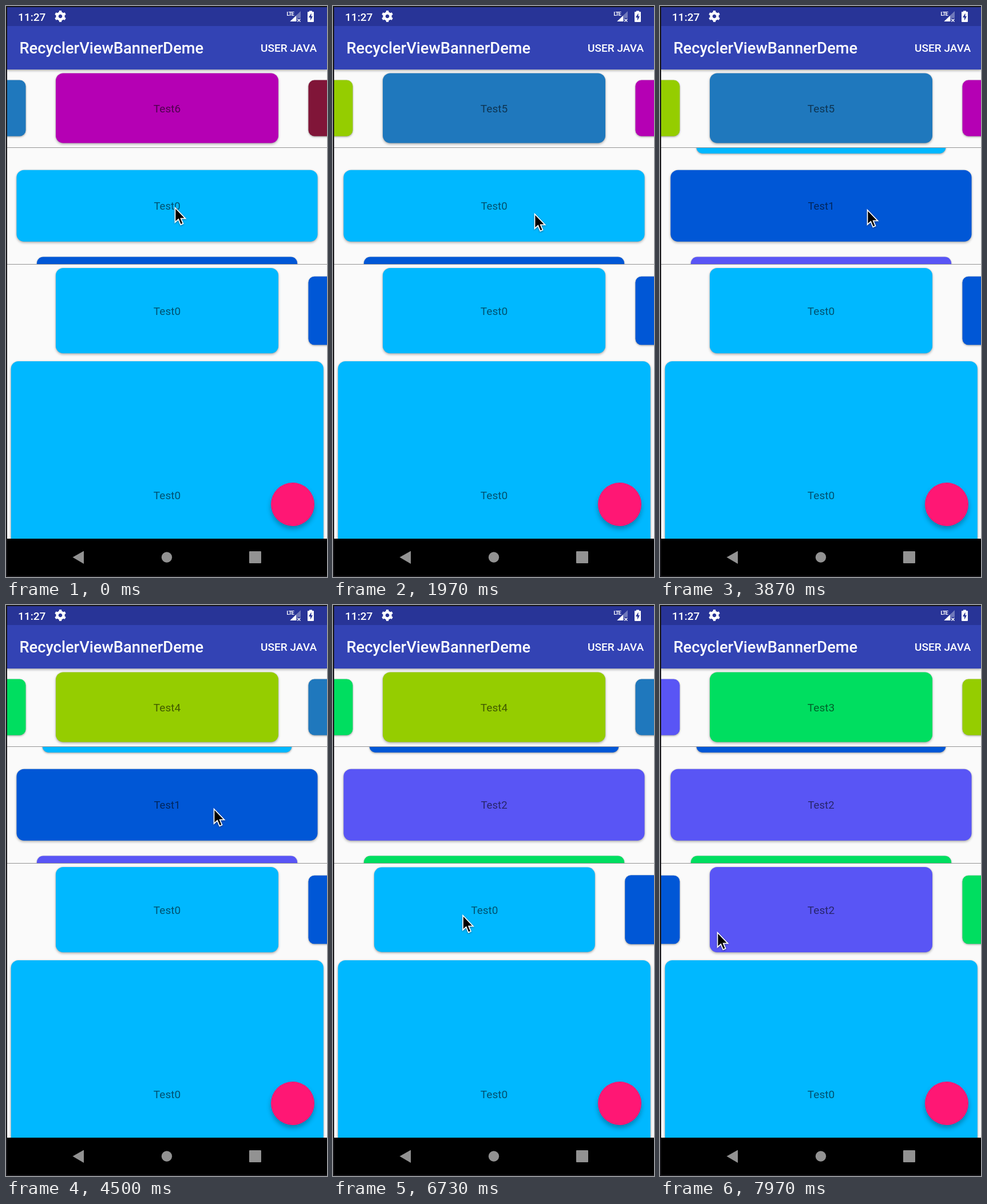
Recreate the animation shown at these times as an HTML page. Size 561 px wide and 998 px high, loop 8000 ms.

```html
<!DOCTYPE html>
<html lang="en">
<head>
<meta charset="utf-8">
<title>Banner demo</title>
<style>
  html, body { margin: 0; width: 100%; height: 100%; overflow: hidden; background: #17161a; }
  #stage { position: relative; width: 561px; height: 998px; overflow: hidden; font-family: Roboto, sans-serif; }
  #app { position: absolute; left: 2px; top: 2px; width: 559px; height: 929px; background: #fafafa; }
  .row { position: absolute; left: 2px; width: 559px; overflow: hidden; }
  .card {
    position: absolute; left: 0; top: 0; border-radius: 13px;
    display: flex; align-items: center; justify-content: center;
    color: rgba(0, 0, 0, .56); font-size: 19.1px; line-height: 1;
    box-shadow: 0 2px 4px rgba(0, 0, 0, .3), 0 0 2px rgba(0, 0, 0, .18);
  }
  .card span { position: relative; top: 1px; }
  #list .card { font-size: 18.6px; }
  .line { position: absolute; left: 2px; width: 559px; height: 1.5px; background: #949494; }
  #bar {
    position: absolute; left: 2px; top: 2px; width: 559px; height: 108.5px;
    background: linear-gradient(#283497 33px, #3343b4 33px);
    box-shadow: 0 2px 4px rgba(0, 0, 0, .32);
  }
  #fab {
    position: absolute; left: 463px; top: 833px; width: 76px; height: 76px;
    border-radius: 50%; background: #ff1774; box-shadow: 0 5px 9px rgba(0, 0, 0, .3);
  }
  #nav { position: absolute; left: 2px; top: 931px; width: 559px; height: 65px; background: #000; }
  svg { position: absolute; left: 0; top: 0; overflow: visible; }
  #pointer { filter: drop-shadow(0 1.5px 1.5px rgba(0, 0, 0, .4)); }
</style>
</head>
<body>
<div id="stage">
  <div id="app"></div>
  <div class="row" id="top" style="top:110px;height:137px"></div>
  <div class="row" id="list" style="top:248px;height:203px"></div>
  <div class="row" id="middle" style="top:452px;height:164px"></div>
  <div class="row" id="page" style="top:616px;height:315px"></div>
  <div class="line" style="top:246.7px"></div>
  <div class="line" style="top:450.5px"></div>
  <div id="bar"></div>
  <div id="fab"></div>
  <div id="nav"></div>
  <svg width="561" height="998" font-family="Roboto, sans-serif" font-weight="500" fill="#fff">
    <text x="21" y="25.5" font-size="19.1">11:27</text>
    <text x="23.5" y="83" font-size="27.3">RecyclerViewBannerDeme</text>
    <text x="445" y="79.5" font-size="19.1">USER JAVA</text>
    <text x="490.5" y="17" font-size="9.5" font-weight="700" letter-spacing="-1">LTE</text>
    <g transform="translate(95 18)">
      <circle r="5.5" fill="none" stroke="#fff" stroke-width="4.4"/>
      <g id="teeth"></g>
    </g>
    <path d="M515 9V21H509V27H496Z" fill="#7079ba"/>
    <path d="M507 17V27H496.500Z"/>
    <path d="M509.500 22.500L514.500 27.500M514.500 22.500L509.500 27.500" stroke="#fff" stroke-width="1.4"/>
    <path d="M530 10V8.500H535V10H537Q538 10 538 11V27Q538 28 537 28H528Q527 28 527 27V11Q527 10 528 10Z"/>
    <path d="M533.500 12.500L529 20H532V25.500L536 18H533.500Z" fill="#283497"/>
    <g fill="#929292">
      <path d="M116.500 963.500L136 952.500V975Z"/>
      <circle cx="281" cy="963.500" r="9.200"/>
      <rect x="425" y="953" width="21" height="21" rx="1"/>
    </g>
  </svg>
  <svg id="pointer" width="24" height="36">
    <path d="M.5 .5V26L6.300 20.800L10.300 30.300L14.600 28.400L10.700 19.300H18.600Z" fill="#000" stroke="#fff" stroke-width="1.7"/>
  </svg>
</div>
<script>
  const LOOP = 8000;
  const COLORS = ['#00b8ff', '#0057d6', '#5955f5', '#00de60', '#95cd00', '#1f78bd', '#b500b4', '#801538'];
  const byId = id => document.getElementById(id);

  const EASE = {
    linear: u => u,
    out: u => 1 - (1 - u) ** 3,
    inOut: u => u * u * (3 - 2 * u)
  };

  // Keys are [time, value, easing into this key].
  function track(keys, t) {
    if (t <= keys[0][0]) return keys[0][1];
    for (let k = 1; k < keys.length; k++) {
      const [t0, v0] = keys[k - 1], [t1, v1, ease = 'inOut'] = keys[k];
      if (t < t1) return v0 + (v1 - v0) * EASE[ease]((t - t0) / (t1 - t0));
    }
    return keys[keys.length - 1][1];
  }

  function makeCards(id, width, height, from = 0, to = 7) {
    const cards = [];
    for (let index = from; index <= to; index++) {
      const el = document.createElement('div');
      el.className = 'card';
      el.innerHTML = `<span>Test${index}</span>`;
      el.style.cssText = `width:${width}px;height:${height}px;background:${COLORS[index]}`;
      byId(id).append(el);
      cards.push({ el, index, width, height });
    }
    return cards;
  }

  function place({ el, width, height }, x, y, scale = 1) {
    el.style.transform = `translate(${x - width / 2}px, ${y - height / 2}px) scale(${scale})`;
  }

  function placeAcross(cards, position, y) {
    for (const card of cards) {
      const d = card.index - position;
      place(card, 279.5 + d * 403, y, 1 - .198 * Math.min(1, Math.abs(d)));
    }
  }

  function placeDown(cards, scroll) {
    for (const card of cards) {
      const y = 349 + card.index * 143.3 - scroll;
      const scale = 1 - .00121 * Math.max(0, 347.6 - y, y - 381);
      place(card, 279.5, y - 248, Math.max(.6, scale));
    }
  }

  const topCards = makeCards('top', 389, 122);
  const listCards = makeCards('list', 526, 124.5);
  const middleCards = makeCards('middle', 389, 149);
  place(makeCards('page', 545.5, 468, 0, 0)[0], 279.5, 239);

  for (let a = 0; a < 360; a += 60) {
    byId('teeth').innerHTML += `<path d="M-2.600 -6L-2 -10H2L2.600 -6Z" transform="rotate(${a})"/>`;
  }

  const AUTO = [
    [1050, 6], [1500, 5], [4050, 5], [4500, 4], [7050, 4], [7500, 3]
  ];
  const LIST = [
    [2590, 0], [2850, 88], [2930, 126, 'linear'], [3220, 143.3, 'out'],
    [4850, 143.3], [5130, 234.5], [5480, 286.6, 'out']
  ];
  const MIDDLE = [
    [6690, 0], [6730, 16 / 403, 'linear'], [6930, .36, 'linear'], [7750, 2, 'out']
  ];
  const POINTER_X = [
    [0, 295], [900, 346], [1970, 352], [2930, 356], [3870, 362], [5130, 364],
    [5450, 364], [6350, 258], [6650, 255], [6730, 228, 'linear'], [6950, 112, 'out'], [7970, 100, 'out']
  ];
  const POINTER_Y = [
    [0, 352], [900, 366], [1970, 363], [2530, 372], [2870, 271], [2950, 271], [3600, 356],
    [4800, 356], [5130, 260], [5450, 256], [6350, 538], [6730, 542], [6950, 562], [7970, 572, 'out']
  ];

  function draw(now) {
    const t = now % LOOP;
    placeAcross(topCards, track(AUTO, t), 68.5);
    placeDown(listCards, track(LIST, t));
    placeAcross(middleCards, track(MIDDLE, t), 80.5);
    byId('pointer').style.transform = `translate(${track(POINTER_X, t)}px, ${track(POINTER_Y, t)}px)`;
  }

  const start = performance.now();
  function frame() {
    draw(performance.now() - start);
    requestAnimationFrame(frame);
  }
  frame();
</script>
</body>
</html>
```
